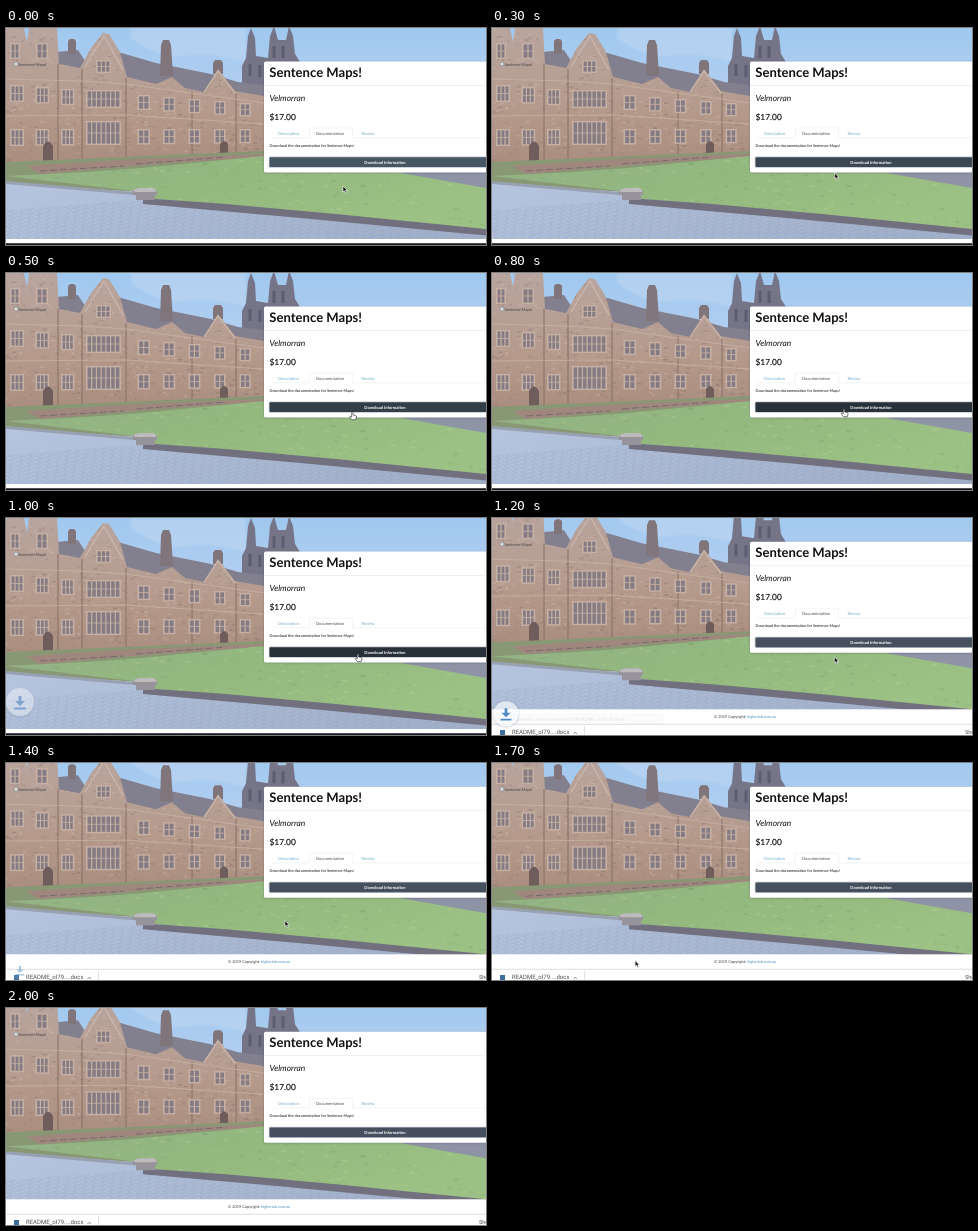
Animation of 480x217 px, one loop 2.1 s. Source, as an HTML page:

```html
<!DOCTYPE html>
<html lang="en">
<head>
<meta charset="utf-8">
<title>Product page download</title>
<style>
html, body { margin: 0; width: 100%; height: 100%; overflow: hidden; background: #fff; }
svg { display: block; width: 480px; height: 217px; }
text { font-family: Lato, "Open Sans", sans-serif; text-rendering: geometricPrecision; white-space: pre; }
.ui { font-family: Roboto, Inter, sans-serif; }
</style>
</head>
<body>
<svg viewBox="0 0 480 217">
  <defs>
    <linearGradient id="sky" x2="0" y2="1">
      <stop stop-color="#9fc8ef"/><stop offset=".3" stop-color="#b4cff0"/><stop offset="1" stop-color="#ccd9ef"/>
    </linearGradient>
    <linearGradient id="stone" x2="0" y2="1">
      <stop stop-color="#b8a59f"/><stop offset=".6" stop-color="#b59a8c"/><stop offset="1" stop-color="#a98d7e"/>
    </linearGradient>
    <linearGradient id="lawn" x2="1" y2=".5">
      <stop stop-color="#93b087"/><stop offset=".5" stop-color="#93b97e"/><stop offset="1" stop-color="#9cc185"/>
    </linearGradient>
    <linearGradient id="path" x2="1" y2=".3">
      <stop stop-color="#b6c5df"/><stop offset="1" stop-color="#a3b1cb"/>
    </linearGradient>
    <pattern id="cobble" width="9" height="4" patternUnits="userSpaceOnUse" patternTransform="rotate(8)">
      <path d="M0 1H6M4 3H9" stroke="#8493b0" stroke-width=".6" opacity=".6"/>
    </pattern>
    <filter id="soft" x="-10%" y="-10%" width="120%" height="120%"><feGaussianBlur stdDeviation="1.2"/></filter>
    <clipPath id="inWall"><use href="#wall"/></clipPath>
    <clipPath id="inLawn"><use href="#grass"/></clipPath>
  </defs>

  <g id="page">
    <rect width="480" height="222" fill="url(#sky)"/>
    <path d="M125 0H240V34Q205 24 180 28T125 10Z" fill="#c3d8f2" opacity=".5" filter="url(#soft)"/>

    <!-- far tower -->
    <path d="M236 62V38L240 30 242 8 245 0 249 10 250 28 262 30 264 8 268-2 272 12 280 12 283-2 287 8 289 26 294 34V62Z" fill="#767587"/>
    <path d="M244 36v12M254 37v12M268 18v12M277 18v12" stroke="#5d5d72" stroke-width="3"/>

    <!-- roofs, chimneys and walls -->
    <path d="M50 24L72 22 85 42H50ZM112 24L150 35 205 46 232 54 258 57V72H112Z" fill="#827f8e"/>
    <path d="M62 26V13l2-2h4l2 2v13zM154 48l1-31 2-5h6l2 5 2 31zM207 46V35l2-3h6l2 3v11z" fill="#81757c"/>
    <path id="wall" d="M0 0H18L21 14 23 0H51L53 36 74 40 85 20 97 5 103 6 114 24 121 49 150 56 166 49 179 60 198 64 212 41 229 63 258 68V130L132 135 0 137Z" fill="url(#stone)"/>
    <g id="masonry" clip-path="url(#inWall)"></g>
    <path d="M79 39L98 8 117 42M198 64L212 43 229 65" fill="none" stroke="#ccb8ad" stroke-width="1.2"/>
    <path d="M52 36V136M76 41V135M120 50V135M186 63V130M230 66V128" stroke="#8d7468" stroke-width="1.6" opacity=".7"/>
    <path d="M0 51L75 53 120 56 258 75M0 88L120 87 258 96" fill="none" stroke="#cbb5a6" opacity=".7"/>
    <g id="windows"></g>
    <path d="M37 134V118q5-9 10 0v16zM214 128v-12q4-6 8 0v12z" fill="#6f5d5b"/>

    <!-- garden -->
    <path d="M0 134L258 123V150L135 164 0 156Z" fill="#899874"/>
    <path d="M20 138L130 131 258 126V129L150 136 34 146Z" fill="#a0877e"/>
    <path d="M34 143L118 138M130 136L220 129" stroke="#786a6e" stroke-dasharray="7 3" fill="none"/>
    <path id="grass" d="M0 148L80 144 135 140 258 128 400 140 480 159V202L400 195 300 184 150 171 128 163Z" fill="url(#lawn)"/>
    <g id="tufts" clip-path="url(#inLawn)"></g>
    <path d="M395 140H480V160Q440 153 395 145Z" fill="#8f93a6"/>

    <!-- walk -->
    <path d="M0 154L130 165 150 174 300 187 480 205V222H0Z" fill="url(#path)"/>
    <path d="M0 182L130 172 300 187 480 205V222H0Z" fill="url(#cobble)"/>
    <path d="M0 153L128 164V167L0 156Z" fill="#98a1b1"/>
    <path d="M137 170L220 176 330 186 480 201V207.500L300 190.500 137 176Z" fill="#72707e"/>
    <path d="M127 162l6-2h15l3 3v4h-2v5h-19v-5h-3z" fill="#96949a"/>
    <path d="M127 162l6-2h15l3 3-2 1h-20z" fill="#bdbbbc"/>

    <g opacity=".85">
      <path d="M8.500 34.500h3v3h-3z" fill="#eef2f5" stroke="#78909c" stroke-width=".5"/>
      <text x="12.500" y="38" font-size="4" fill="#30323b">Sentence Maps!</text>
    </g>

    <!-- product card -->
    <rect x="258" y="34" width="230" height="111" rx="1.500" fill="#33405a" opacity=".35" filter="url(#soft)"/>
    <rect x="258" y="33.500" width="230" height="111" rx="1.500" fill="#fff"/>
    <path d="M258 57.500H480" stroke="#e3e5e8" stroke-width=".6"/>
    <g fill="#111">
      <text x="263.300" y="49" font-size="13.100" font-weight="700">Sentence Maps!</text>
      <text x="263.500" y="73" font-size="8.400" font-style="italic">Velmorran</text>
      <text x="263.500" y="91.700" font-size="8.400" stroke="#111" stroke-width=".15">$17.00</text>
      <text x="263.500" y="119" font-size="3.870">Download the documentation for Sentence Maps!</text>
    </g>
    <path d="M264 109.800H303.500V101q0-1 1-1H345.500q1 0 1 1v8.800H480" fill="none" stroke="#e9ecef" stroke-width=".6"/>
    <g font-size="4.100" text-anchor="middle" fill="#74abc9">
      <text x="282.500" y="106.700">Description</text>
      <text x="324" y="106.700" fill="#495057">Documentation</text>
      <text x="362" y="106.700">Review</text>
    </g>
    <rect x="262.800" y="128.600" width="224" height="11.200" rx="1.500" fill="#7d8a98" opacity=".5"/>
    <rect id="button" x="263.500" y="129.300" width="222" height="9.700" rx="1"/>
    <text x="379" y="135.600" font-size="4.100" font-weight="700" text-anchor="middle" fill="#fff">Download Information</text>
  </g>

  <g id="before">
    <rect y="211" width="480" height="4.500" fill="#fff"/>
    <rect y="215.300" width="480" height="1.700" fill="#15171a"/>
  </g>

  <g id="after">
    <rect y="191.300" width="480" height="26" fill="#fff"/>
    <text x="222" y="200.300" font-size="3.900" fill="#343a40">© 2019 Copyright: <tspan fill="#4a91bd">higherlab.com.au</tspan></text>
    <g id="status">
      <rect x="-1" y="196.500" width="172" height="9.500" rx="1.500" fill="#f5f6f7" stroke="#d5d8db" stroke-width=".6"/>
      <text class="ui" x="3" y="203" font-size="5" fill="#8a9097">https://higherlab.com.au/media/24/README_oI79JD.docx</text>
    </g>
    <path d="M0 206.300H480" stroke="#cfd2d5" stroke-width=".7"/>
    <path d="M92.500 208V217" stroke="#d3d6d9" stroke-width=".7"/>
    <rect x="8" y="212" width="5" height="5" fill="#3d6d9c"/>
    <text id="file" class="ui" x="20" y="216.300" font-size="6" fill="#4b4f54"></text>
    <path d="M81.500 216l1.800-1.800 1.800 1.800" fill="none" stroke="#696e74" stroke-width=".8"/>
    <text class="ui" x="473" y="216.300" font-size="5.500" fill="#4b4f54">Show All</text>
  </g>

  <g id="badge">
    <g id="disc">
      <circle cy="1" r="14.500" fill="#58688a" opacity=".3" filter="url(#soft)"/>
      <circle r="14" fill="#f7f9fc"/>
    </g>
    <path d="M-1.500-6H1.500V-1H5L0 4-5-1H-1.500ZM-6 5.500H6V7.500H-6Z" fill="#4385c5"/>
  </g>

  <g id="cursor" stroke="#fff" stroke-linejoin="round">
    <path id="arrow" d="M0 0V6L1.400 4.800 2.500 7.100 3.500 6.600 2.500 4.400H4.300Z" fill="#111" stroke-width=".6"/>
    <path id="hand" d="M-.7 0Q0-.8.700 0V2.500L3.500 3.100Q4.200 3.300 4 4.300L3.300 7.200H-.6L-2.700 4.300Q-2.500 3.300-1.500 3.800L-.7 4.400Z" fill="#fff" stroke="#222" stroke-width=".6"/>
  </g>
</svg>
<script>
const STEP = 100, LOOP = 2100;
const HOVER = 8, SCROLL = 11, LAST = 20;

const $ = id => document.getElementById(id);
const set = (id, attrs) => Object.entries(attrs).forEach(([k, v]) => $(id).setAttribute(k, v));
const show = (id, on) => set(id, { visibility: on ? "visible" : "hidden" });
const mix = (a, b, p) => a + (b - a) * p;
const span = (n, from, to) => Math.min(1, Math.max(0, (n - from) / (to - from)));
const easeOut = p => 1 - (1 - p) ** 2;
const easeInOut = p => p * p * (3 - 2 * p);
const box = (x, y, w, h, fill, opacity = 1) =>
  `<rect x="${x}" y="${y}" width="${w}" height="${h}" fill="${fill}" opacity="${opacity}"/>`;

let seed = 7;
const rand = () => (seed = seed * 16807 % 2147483647) / 2147483647;

// Scatter small light and dark marks to roughen a flat area.
function speckle(count, x, y, w, h, size, light, dark) {
  let s = "";
  for (let i = 0; i < count; i++)
    s += box(x + rand() * w, y + rand() * h, size * (1 + 2 * rand()), size, rand() < .5 ? light : dark, .12 + rand() * .2);
  return s;
}

function bay(x, y, w, h) {
  const cols = Math.round(w / 4.500), pane = w / cols;
  let s = box(x - 1, y - 1, w + 2, h + 2, "#c6b0a3");
  for (let i = 0; i < cols * 2; i++)
    s += box(x + (i % cols) * pane + .6, y + (i < cols ? 0 : h / 2) + .4, pane - 1.200, h / 2 - .8, "#857b83");
  return s;
}

function facade() {
  let s = bay(81, 63, 33, 16) + bay(81, 94, 33, 22) + bay(91, 33, 13, 11);
  for (let i = 0; i < 10; i++) {
    const x = 5 + i * 25.500, w = 12 - i * .3;
    if (x > 74 && x < 122) continue;
    s += bay(x, 58 + i * 2, w, 15 - i * .4) + bay(x, 102, w, 15 - i * .3);
  }
  return s + bay(5, 16, 8, 14) + bay(31, 16, 10, 14);
}

$("masonry").innerHTML = speckle(700, 0, 0, 258, 136, 1.500, "#dcc6b6", "#75605c");
$("tufts").innerHTML = speckle(260, 0, 128, 480, 78, 2, "#bcd69c", "#73966a");
$("windows").innerHTML = facade();

function pointer(n) {
  if (n < SCROLL) {
    const p = span(n, 0, HOVER);
    return [mix(337, 352, p), mix(158, 136.500, easeOut(p))];
  }
  const p = easeInOut(span(n, SCROLL, LAST));
  return [mix(352, 70, p), mix(136, 219, p)];
}

function draw(n) {
  const scrolled = n >= SCROLL;
  set("page", { transform: `translate(0 ${scrolled ? -9.800 : 0})` });
  show("before", !scrolled);
  show("after", scrolled);
  set("status", { opacity: .55 * (1 - span(n, SCROLL, SCROLL + 2)) });
  $("file").textContent = n === SCROLL ? "README" : "README_oI79....docx";

  const dark = span(n, 0, HOVER);
  set("button", { fill: scrolled ? "#454f5e" : `hsl(207 17% ${mix(33, 19, dark)}%)` });

  const rise = span(n, HOVER, SCROLL), fall = span(n, SCROLL, SCROLL + 4);
  set("badge", {
    transform: `translate(14 ${172 + 18 * rise + 23 * fall}) scale(${1 - .4 * fall})`,
    opacity: rise ** 2 * (1 - fall ** 2)
  });
  set("disc", { opacity: 1 - fall });

  const [x, y] = pointer(n), hand = !scrolled && y < 142;
  set("cursor", { transform: `translate(${x} ${y})` });
  show("hand", hand);
  show("arrow", !hand);
}

const start = performance.now();
function tick() {
  draw(Math.floor((performance.now() - start) % LOOP / STEP));
  requestAnimationFrame(tick);
}
tick();
</script>
</body>
</html>
```
